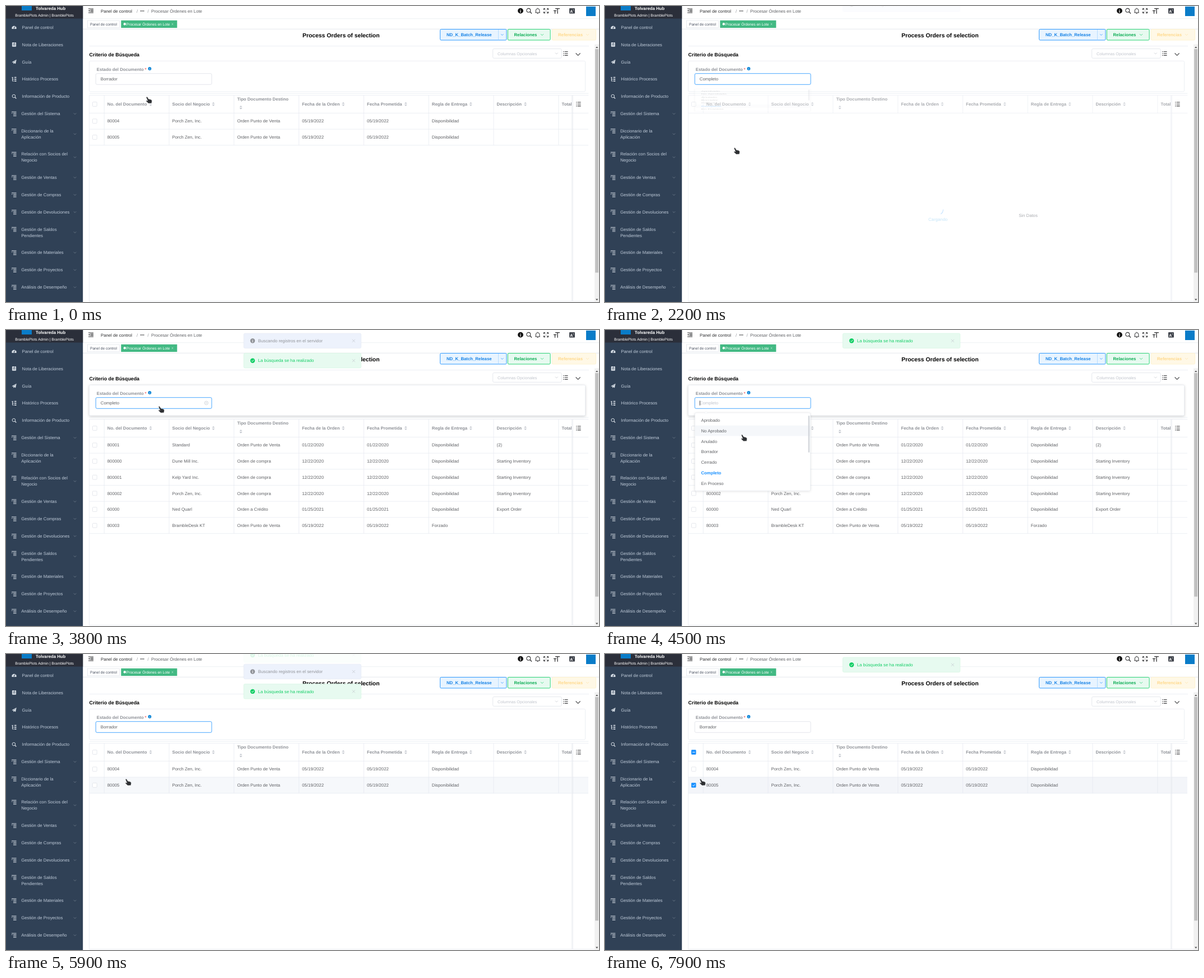
Animation, 1058 px wide and 529 px high, one loop 8000 ms. Source, as an HTML page:

```html
<!DOCTYPE html>
<html lang="es">
<head>
<meta charset="utf-8">
<title>Procesar Órdenes en Lote</title>
<style>
html, body { margin: 0; width: 100%; height: 100%; overflow: hidden; background: #fff; }
svg { display: block; width: 100vw; height: 100vh; }
text { font-family: "Liberation Sans", Arial, sans-serif; text-rendering: geometricPrecision; white-space: pre; }
</style>
</head>
<body>
<svg id="stage" viewBox="0 0 1058 529"></svg>
<script>
const LOOP = 8000, GREY = '#909399', BODY = '#606266', LINE = '#e4e8f0', BLUE = '#1890ff', LOGO = '#0a7cc8';

// ---------- drawing helpers ----------
const text = (x, y, s, fill = BODY, size = 7.75, more = '') =>
  `<text x="${x}" y="${y}" fill="${fill}" font-size="${size}" ${more}>${s}</text>`;
const bold = (x, y, s, fill, size, more = '') => text(x, y, s, fill, size, 'font-weight="700" ' + more);
const rect = (x, y, w, h, fill, more = '') =>
  `<rect x="${x}" y="${y}" width="${w}" height="${h}" fill="${fill}" ${more}/>`;
const line = (d, stroke = LINE, width = .7, more = '') =>
  `<path d="${d}" fill="none" stroke="${stroke}" stroke-width="${width}" ${more}/>`;
const shape = (d, fill, more = '') => `<path d="${d}" fill="${fill}" ${more}/>`;
const disc = (x, y, r, fill, more = '') => `<circle cx="${x}" cy="${y}" r="${r}" fill="${fill}" ${more}/>`;
const group = (id, inner, more = '') => `<g id="${id}" ${more}>${inner}</g>`;
const shift = (x, y, inner) => `<g transform="translate(${x} ${y})">${inner}</g>`;
const chevron = (x, y, w, color, width = .7) => line(`M${x - w} ${y - w / 2}l${w} ${w}l${w} ${-w}`, color, width);
const cross = (x, y, r, color, width = .7) => line(`M${x - r} ${y - r}l${2 * r} ${2 * r}m0 ${-2 * r}l${-2 * r} ${2 * r}`, color, width);
const info = (x, y, r, fill) => disc(x, y, r, fill) +
  bold(x, y + r * .62, 'i', '#fff', r * 1.7, 'text-anchor="middle"');
const listIcon = (x, y, color) => [-3.3, 0, 3.3].map(d =>
  line(`M${x - 4.2} ${y + d}h1.4m1.2 0h5.8`, color, 1.1)).join('');

// ---------- sidebar ----------
const TREE = line('M-4.5-3.4h8.5M-1.5-1h5.5M-1.5 1.4h5.5M-1.5 3.8h5.5', '#d5dce4', 1) + line('M-4.5-1h1.5', '#d5dce4', 1);
const ICONS = [
  shape('M-4 3A4.2 4.2 0 1 1 4 3Z', '#d5dce4') + line('M0 1.8L1.5-1.6', '#304156', .9) + disc(0, 1.6, 1, '#304156'),
  rect(-3.6, -3.8, 7.2, 7.6, '#d5dce4', 'rx=".8"') + line('M-2-1.2h4M-2 .8h4M.5-3.8v2', '#304156', .8),
  shape('M-4 .4L4.2-4L2.6 3.6L0 2.2L-1.4 4L-1.6 1.4Z', '#d5dce4') + line('M-1.6 1.4L2.4-2', '#304156', .5),
  line('M-4.2-3h3M-3-3v6.4h2.6M-3 .2h2.6', '#d5dce4', 1) + line('M.5-3H4M.5 .2H4M.5 3.4H4', '#d5dce4', 1.8),
  '<circle cx="-.6" cy="-.6" r="2.8" fill="none" stroke="#d5dce4"/>' + line('M1.4 1.4L3.8 3.8', '#d5dce4', 1.3)
];
const MENU = ['Panel de control', 'Nota de Liberaciones', 'Guía', 'Histórico Procesos', 'Información de Producto',
  'Gestión del Sistema', 'Diccionario de la|Aplicación', 'Relación con Socios del|Negocio', 'Gestión de Ventas',
  'Gestión de Compras', 'Gestión de Devoluciones', 'Gestión de Saldos|Pendientes', 'Gestión de Materiales',
  'Gestión de Proyectos', 'Análisis de Desempeño'];

function sidebar() {
  let out = rect(0, 0, 137.2, 529, '#304156') + rect(0, 0, 137.2, 22.5, '#2b2f3a') +
    rect(28, -10, 18, 18, LOGO) + bold(53, 6.6, 'Tolvareda Hub', '#fff') +
    text(68.5, 18.5, 'BramblePlots Admin | BramblePlots', '#fff', 6.64, 'text-anchor="middle"');
  let top = 22.5;
  MENU.forEach((label, i) => {
    const rows = label.split('|'), h = rows.length > 1 ? 41.5 : 30.92, mid = top + h / 2;
    out += shift(14.5, mid - (rows.length > 1 ? 5.5 : 0), ICONS[i] || TREE);
    rows.forEach((s, k) => out += text(i < 5 ? 28.6 : 27.2, mid + 2.7 + (k - (rows.length - 1) / 2) * 11, s, '#bfcbd9'));
    if (i > 4) out += chevron(123, mid, 2.2, '#7d8a99');
    top += h;
  });
  return out;
}

// ---------- page top ----------
function topBar() {
  const dark = '#303133';
  const corners = [[-1, -1], [1, -1], [-1, 1], [1, 1]].map(([a, b]) =>
    line(`M${963.5 + a * 1.2} ${8.6 + b * 1.2}l${a * 2.8} ${b * 2.8}m${-a * 2.6} 0h${a * 2.6}v${-b * 2.6}`, dark, 1)).join('');
  return line('M147 5h9M150.5 7.4h5.5M150.5 9.6h5.5M147 12h9', dark, 1.1) + shape('M147 8.5l2.4-1.7v3.4z', dark) +
    text(169, 11.5, 'Panel de control', dark) + text(233, 11.5, '/', GREY) + text(252.5, 11.5, '/', GREY) +
    [240.6, 243.1, 245.6].map(x => disc(x, 8.8, .9, dark)).join('') +
    text(259, 11.5, 'Procesar Órdenes en Lote') +
    info(918, 8.6, 4.9, '#111') +
    '<circle cx="932.3" cy="7.8" r="3.4" fill="none" stroke="#303133" stroke-width="1.1"/>' + line('M934.8 10.3l3.2 3.2', dark, 1.3) +
    line('M944.3 11.8h8.6M945.3 11.8V8a3.3 3.3 0 0 1 6.6 0v3.8M947.4 13.4h2.4M948.6 4.6v-1', dark, 1) + corners +
    line('M980 4.6h8M984 4.6v9.2M977 8.4h5M979.5 8.4v5.4', dark, 1.3) +
    rect(1005, 4, 10, 9.5, '#40444c', 'rx="1"') + bold(1006.3, 11.5, 'A', '#fff', 7) + text(1011.4, 8, 'x', '#fff', 4) +
    rect(1035, 1, 17, 17, LOGO) +
    line('M137 22.6h921', '#e8ebf0') + line('M137 41.3h921', '#d8dce5', .8) +
    rect(145.5, 26, 57, 12.9, '#fff', 'stroke="#d8dce5" stroke-width=".6"') + text(150, 34.8, 'Panel de control', '#495060', 6.64) +
    rect(205.3, 25.7, 100, 13.4, '#42b983') + disc(211.8, 32.2, 2.2, '#fff') +
    text(214.8, 34.8, 'Procesar Órdenes en Lote', '#fff', 6.64) + cross(297, 32.4, 1.3, '#d8f0e5', .6);
}

const button = (x, w, fill, edge, color, label, tx) =>
  rect(x, 41.6, w, 19.4, fill, `rx="1.8" stroke="${edge}" stroke-width=".9"`) + bold(tx, 54.2, label, color);

function heading() {
  return rect(137.2, 41.8, 921, 29, '#fff') +
    bold(597.8, 55.7, 'Process Orders of selection', '#000', 10.35, 'text-anchor="middle"') +
    button(774.6, 118.4, '#e8f4ff', BLUE, '#1682e6', 'ND_K_Batch_Release', 786) +
    line('M878.5 42v18.6', '#a3d3ff') + chevron(885.3, 51.3, 2.2, BLUE) +
    button(895.3, 75.8, '#e7faf0', '#13ce66', '#0fae56', 'Relaciones', 906.5) + chevron(956.5, 51.3, 2.5, '#13ce66') +
    button(974.2, 78.4, '#fff8e6', '#fff1cc', '#ffd98c', 'Referencias', 985) + chevron(1037.5, 51.3, 2.5, '#ffe3a6') +
    line('M148.5 71.6H1040') +
    rect(1050.2, 68.5, 7.8, 460.5, '#f1f1f1') + rect(1051.2, 77, 5.8, 399.5, '#c1c1c1') +
    shape('M1052 75h4.4l-2.2-2.6zM1052 523.6h4.4l-2.2 2.6z', '#505050');
}

function criteria() {
  return bold(148.6, 90, 'Criterio de Búsqueda', '#000', 8.85) +
    rect(868.6, 76.5, 122.6, 16.8, '#fff', 'rx="2" stroke="#dcdfe6" stroke-width=".7"') +
    text(877, 87.5, 'Columnas Opcionales', '#c0c4cc', 7.2) + chevron(982.3, 84.8, 2.4, '#c0c4cc') +
    listIcon(998.3, 84.8, '#303133') + chevron(1020.6, 86.3, 4, '#303133', 1.1) +
    group('glow', rect(148.5, 99.5, 885, 55, '#000', 'opacity=".2" filter="url(#blur)"')) +
    rect(148.5, 98.3, 885, 54.7, '#fff', `rx="2" stroke="${LINE}" stroke-width=".7"`) +
    bold(161.8, 115.7, 'Estado del Documento', GREY) + bold(247.4, 116, '*', '#f56c6c') + info(256.4, 112, 2.9, '#0a84d6') +
    rect(160.2, 120.7, 206.8, 19.6, '#fff', 'id="field" rx="2.2" stroke-width=".8"') +
    text(168.8, 133.4, '', BODY, 7.75, 'id="value"') +
    group('clear', disc(357.4, 130.4, 3.2, 'none', 'stroke="#c0c4cc" stroke-width=".7"') + cross(357.4, 130.4, 1.2, '#c0c4cc')) +
    line('M169.3 126.3v8.6', '#222', .8, 'id="caret"');
}

// ---------- table ----------
const COLS = [175.2, 291, 406.8, 522.6, 638.4, 754.2, 870, 985.9];
const HEADS = ['No. del Documento', 'Socio del Negocio', 'Tipo Documento Destino', 'Fecha de la Orden',
  'Fecha Prometida', 'Regla de Entrega', 'Descripción', 'Total'];
const SORT_X = [258, 370, 419, 601.8, 713.2, 829.2, 926.6];
const TOP = 191.4, ROW = 28.72;
const buy = (no, who) => [no, who, 'Orden de compra', '12/22/2020', 'Disponibilidad', 'Starting Inventory'];
const sale = (no, who, date, rule = 'Disponibilidad', note = '') => [no, who, 'Orden Punto de Venta', date, rule, note];
const DRAFTS = ['80004', '80005'].map(no => sale(no, 'Porch Zen, Inc.', '05/19/2022'));
const DONE = [sale('80001', 'Standard', '01/22/2020', undefined, '(2)'), buy('800000', 'Dune Mill Inc.'),
  buy('800001', 'Kelp Yard Inc.'), buy('800002', 'Porch Zen, Inc.'),
  ['60000', 'Ned Quarl', 'Orden a Crédito', '01/25/2021', 'Disponibilidad', 'Export Order'],
  sale('80003', 'BrambleDesk KT', '05/19/2022', 'Forzado')];

const checkbox = cy => rect(154.4, cy - 3.9, 7.8, 7.8, '#fff', 'rx="1.1" stroke="#dcdfe6" stroke-width=".7"');
const checked = (id, cy, mark) => group(id, rect(154, cy - 4.2, 8.4, 8.4, BLUE, 'rx="1.1"') + line(mark, '#fff', 1));

const rowSet = rows => rows.map(([no, who, type, date, rule, note], i) => {
  const y = TOP + i * ROW, mid = y + ROW / 2;
  return checkbox(mid) + COLS.map(x => line(`M${x} ${y}v${ROW}`)).join('') + line(`M148.5 ${y + ROW}H1039`) +
    [no, who, type, date, date, rule, note].map((s, c) => text(COLS[c] + 5.6, mid + 2.7, s)).join('');
}).join('');

function table() {
  const head = HEADS.map((s, i) => {
    const two = i === 2, sx = SORT_X[i], sy = two ? 181.3 : 175.4;
    return line(`M${COLS[i]} 159.6V${TOP}`) + bold(COLS[i] + 5.6, two ? 168.7 : 178.1, s, GREY) +
      (sx ? shape(`M${sx - 2.5} ${sy - .8}h5l-2.5-2.6zM${sx - 2.5} ${sy + .8}h5l-2.5 2.6z`, '#c0c4cc') : '');
  }).join('');
  return line('M148.5 156.2H1039.3') + line('M148.5 159.6H1039.3M148.5 159.6V527.4H1050') +
    rect(148.8, TOP + ROW, 890.2, ROW, '#f3f5f9', 'id="hover"') +
    head + checkbox(175.5) + line(`M148.5 ${TOP}H1039.3`) +
    group('drafts', rowSet(DRAFTS)) + group('done', rowSet(DONE)) +
    checked('rowCheck', TOP + ROW * 1.5, `M156.2 ${TOP + ROW * 1.5}l1.5 1.6l2.8-3.2`) +
    checked('headCheck', 175.5, 'M156 175.5h4.5') +
    group('empty', text(755, 376.8, 'Sin Datos', GREY, 7.75, 'text-anchor="middle"')) +
    line('M1009.6 159.6V527', '#eef0f4', 1.2) + line('M1011.2 159.6V527', '#dfe3ea') +
    group('mask', rect(148, 159, 891.5, 368, '#fff', 'opacity=".9"') +
      line('M603.3 364a9.3 9.3 0 0 1-4 7.6', BLUE, 1.1, 'stroke-linecap="round"') +
      text(594, 384, 'Cargando', '#1e9be8', 7.75, 'text-anchor="middle"')) +
    listIcon(1021.4, 175.3, '#303133');
}

// ---------- dropdown, messages, pointer ----------
const OPTIONS = ['Aprobado', 'No Aprobado', 'Anulado', 'Borrador', 'Cerrado', 'Completo', 'En Proceso'];
const LIST = 151.8, ITEM = 18.8;
const dropdown = () => group('menu',
  rect(160.2, 149, 206, 139, '#000', 'opacity=".13" filter="url(#blur)"') +
  rect(160.4, 148, 206, 139.4, '#fff', 'rx="2" stroke="#e4e7ed" stroke-width=".6"') +
  shape('M177 148.3l3.3-3.4l3.3 3.4z', '#fff', 'stroke="#e4e7ed" stroke-width=".4"') +
  rect(160.8, 0, 205.2, ITEM, '#f5f7fa', 'id="itemHover"') +
  OPTIONS.map((s, i) => text(171.5, LIST + ITEM * (i + .5) + 2.7, s, BODY, 7.75, 'class="option"')).join('') +
  rect(362.6, 153, 2.4, 66, '#d3d6db', 'rx="1.2"'));

function message(id, ok) {
  const color = ok ? '#13ce66' : GREY;
  return group(id, rect(424.2, 0, 209.4, 26.5, ok ? '#e7faf0' : '#edf2fc', `rx="2.2" stroke="${ok ? '#d0f5e0' : '#e3e8f2'}" stroke-width=".6"`) +
    (ok ? disc(440, 13.3, 4.2, color) + line('M438 13.3l1.5 1.6l2.7-3', '#fff', .9) : info(440, 13.3, 4.2, color)) +
    text(449.8, 16, ok ? 'La búsqueda se ha realizado' : 'Buscando registros en el servidor', color) +
    cross(620.3, 13.3, 2.5, '#c0c4cc'));
}

const HAND = 'M-4.8-4.8Q-4.2-6.2-2.8-5.4L-.6-1.8L3-1Q5.4-.4 5.4 1.6L4.8 5.8L-.8 6L-4.6 2.6Q-5.4 1.4-4.2 .8L-2.2 1.4Z';
const ARROW = 'M0 0V10.4L2.4 8.3L4 12L5.6 11.3L4 7.7H7.2Z';

const stage = document.getElementById('stage');
stage.innerHTML = '<defs><filter id="blur" x="-10%" y="-30%" width="120%" height="160%"><feGaussianBlur stdDeviation="2.4"/></filter></defs>' +
  rect(0, 0, 1058, 529, '#fff') + criteria() + table() + topBar() + heading() + sidebar() + dropdown() +
  message('m0', false) + message('m1', true) + message('m2', false) + message('m3', true) +
  group('pointer', shape(HAND, '#2e3033', 'id="hand" stroke="#fff" stroke-width=".4"') +
    shape(ARROW, '#111', 'id="arrow" stroke="#fff" stroke-width=".6"'));

// ---------- timeline ----------
// The screen only refreshes inside these spans, every 100 ms.
const SPANS = [[0, 1400], [1600, 1800], [2000], [2200, 2400], [3100, 3300], [3600], [3800], [4100, 4300], [4500, 4600],
  [4800, 4900], [5100], [5400, 5500], [5700, 5900], [6100], [6300], [6700], [6900, 7500], [7700], [7900]];
const PATH = [[0, 255, 168], [100, 256, 160], [300, 258, 140], [400, 258, 134], [500, 258, 134], [600, 256, 142], [900, 241, 215],
  [1200, 237, 258], [1400, 235, 271], [1600, 235, 270], [1800, 235, 259], [2300, 235, 259], [2400, 238, 250], [3000, 238, 250],
  [3200, 262, 180], [3300, 268, 151], [3500, 268, 151], [3600, 268, 150], [3800, 277, 142], [4100, 277, 138], [4200, 277, 138],
  [4300, 274, 150], [4600, 235, 214], [4800, 222, 226], [4900, 219, 226], [5100, 217, 225], [5600, 217, 225],
  [5900, 218, 229], [6300, 218, 229], [6700, 174, 239], [7100, 161, 240], [7300, 160, 240], [7700, 160, 241], [7900, 174, 229]];
const OPEN = [[400, 0], [500, .35], [600, .8], [700, 1], [2100, 1], [2200, .29], [2300, 0], [4100, 0], [4200, .4], [4300, 1],
  [5300, 1], [5400, .2], [5500, 0]];
const MASK = [[2100, 0], [2200, .26], [2300, .7], [2400, 1], [3000, 1], [3100, .7], [3200, .3], [3300, 0],
  [5300, 0], [5400, .36], [5500, 1], [5600, 1], [5700, .6], [5800, .2], [5900, 0]];
const appear = t => [[t - 100, 0], [t, .16], [t + 100, .7], [t + 200, 1]];
const LEAVE_A = [[4000, 0], [4100, .15], [4200, .55], [4300, .9], [4500, 1]];
const LEAVE_B = [[5700, 0], [5800, .15], [5900, .655], [6100, .98], [6300, 1]];
const LEAVE_C = [[7200, 0], [7300, .035], [7400, .55], [7500, .94], [7700, 1]];
const STEP = 35.4, FIRST = 6;
// slot: starting place in the stack; ups: departures that lift the message
const MESSAGES = [
  { slot: 0, enter: appear(2200), ups: [], leave: LEAVE_A },
  { slot: 1, enter: appear(3100), ups: [LEAVE_A], leave: LEAVE_B },
  { slot: 1, enter: [[5300, 0], [5400, .2], [5500, 1]], ups: [LEAVE_B], leave: LEAVE_C },
  { slot: 2, enter: appear(5700), ups: [LEAVE_B, LEAVE_C], leave: [[8000, 0]] }
];

function tween(keys, t) {
  const i = keys.findIndex(k => k[0] > t);
  if (i === 0) return keys[0].slice(1);
  if (i < 0) return keys[keys.length - 1].slice(1);
  const a = keys[i - 1], b = keys[i], p = (t - a[0]) / (b[0] - a[0]);
  return a.slice(1).map((v, k) => v + (b[k + 1] - v) * p);
}
const level = (keys, t) => tween(keys, t)[0];

function refreshTime(now) {
  const t = Math.floor(now % LOOP / 100) * 100;
  const [from, to = from] = SPANS.filter(s => s[0] <= t).pop();
  return Math.min(t, to);
}

const $ = id => document.getElementById(id);
const show = (id, on) => $(id).style.display = on ? '' : 'none';
const within = (t, a, b) => t >= a && t < b;
const options = [...document.querySelectorAll('.option')];

function render(t) {
  const [x, y] = tween(PATH, t), open = level(OPEN, t), mask = level(MASK, t);
  const choice = within(t, 2200, 5400) ? 'Completo' : 'Borrador';
  const start = within(t, 500, 2200) ? 500 : within(t, 4200, 5400) ? 4300 : 0;
  const overField = within(t, 200, 700) || within(t, 3800, 4300);

  $('value').textContent = choice;
  $('value').setAttribute('fill', start ? '#c0c4cc' : BODY);
  $('field').setAttribute('stroke', within(t, 500, 7700) ? BLUE : overField ? '#c0c4cc' : '#dcdfe6');
  show('caret', start && Math.floor(Math.max(0, t - start) / 500) % 2 === 0);
  show('clear', overField);
  show('glow', within(t, 3200, 5400));

  show('drafts', t < 2200 || t >= 5700);
  show('done', within(t, 3100, 5400));
  show('empty', within(t, 2200, 3100) || within(t, 5400, 5700));
  show('rowCheck', t >= 7700);
  show('headCheck', t >= 7900);
  $('hover').style.opacity = level([[5700, 0], [5900, .7], [6100, 1]], t);
  $('mask').style.opacity = mask;

  show('menu', open > 0);
  $('menu').style.opacity = open;
  $('menu').setAttribute('transform', `translate(0 ${148 * (1 - open)}) scale(1 ${open})`);
  const item = Math.floor((y - 6 - LIST) / ITEM);
  show('itemHover', item >= 0 && item < OPTIONS.length);
  $('itemHover').setAttribute('y', LIST + item * ITEM);
  options.forEach(o => {
    const on = o.textContent === choice;
    o.setAttribute('fill', on ? BLUE : BODY);
    o.setAttribute('font-weight', on ? 700 : 400);
  });

  MESSAGES.forEach((m, i) => {
    const inn = level(m.enter, t), out = level(m.leave, t);
    const lift = m.ups.reduce((sum, keys) => sum + level(keys, t), 0);
    const top = FIRST + (m.slot - lift) * STEP - (1 - inn + out) * 26.5;
    $('m' + i).style.opacity = Math.min(1, inn * 1.25) * Math.max(0, 1 - out * 1.3);
    $('m' + i).setAttribute('transform', `translate(0 ${top})`);
  });

  const arrow = within(t, 3300, 3800);
  show('arrow', arrow);
  show('hand', !arrow);
  $('pointer').setAttribute('transform', `translate(${x} ${y})`);
}

const begin = performance.now();
function frame() {
  render(refreshTime(performance.now() - begin));
  requestAnimationFrame(frame);
}
frame();
</script>
</body>
</html>
```
